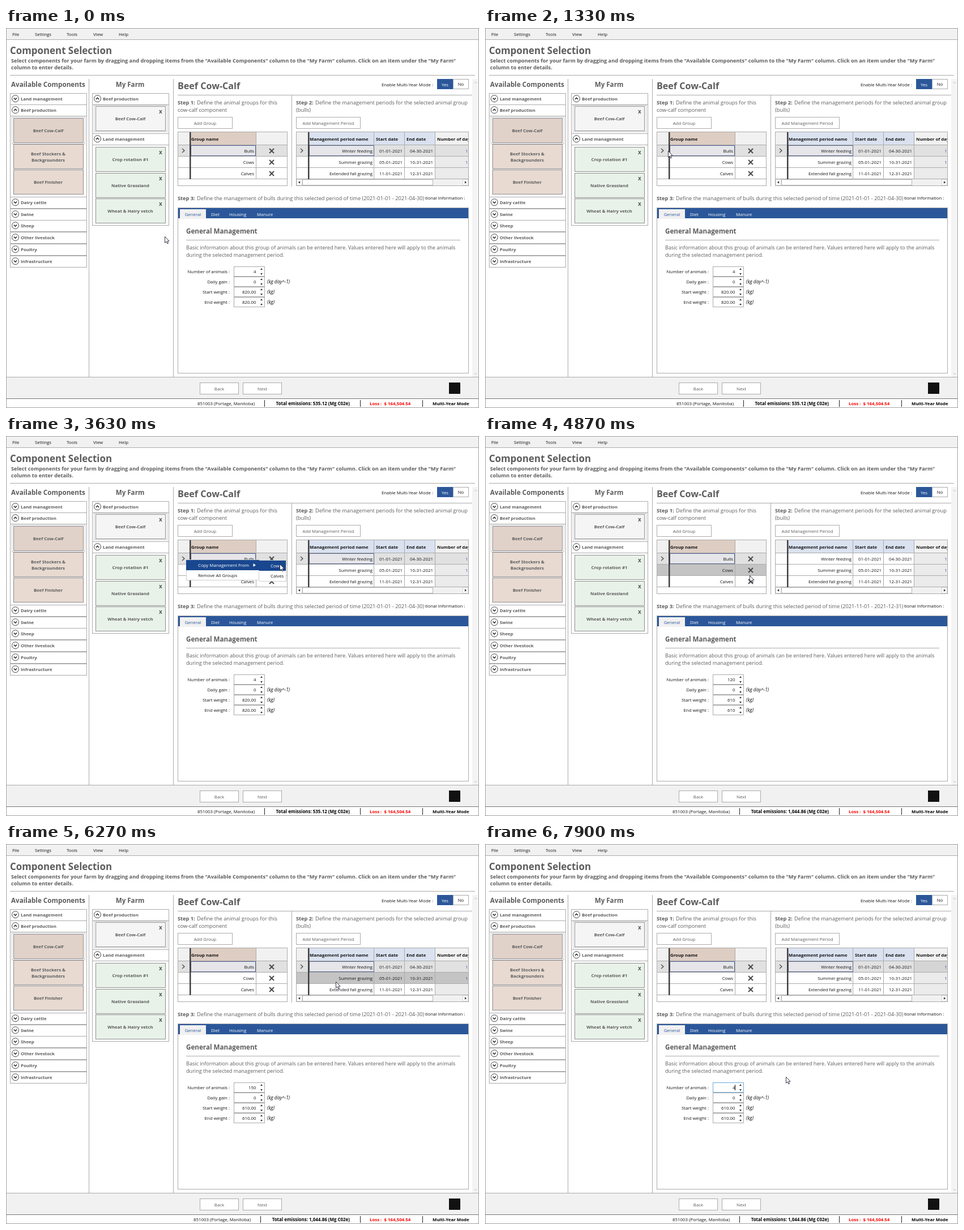
An HTML page with a canvas that plays this animation: 835x671 px, repeating every 8000 ms.

```html
<!DOCTYPE html>
<html lang="en">
<head>
<meta charset="utf-8">
<title>Component Selection</title>
<style>
  html, body { margin: 0; width: 100%; height: 100%; overflow: hidden; background: #fff; }
  canvas { display: block; }
</style>
</head>
<body>
<canvas id="stage" width="835" height="671"></canvas>
<script>
const ctx = document.getElementById('stage').getContext('2d');
const LOOP = 8000;
const GRAY = '#5c5c5c', INK = '#151515', EDGE = '#ababab', PANEL = '#f1f1f1';
const BLUE = '#2b579a', MENU_BLUE = '#19478f', SELECTED = '#e1e1e1', HOVER = '#c4c4c4';
const SMALL = 7.85, BODY = 9.25;

// Pointer path: [ms, x, y]
const PATH = [
  [70, 280, 368], [870, 335, 236], [1330, 323, 217], [1430, 318, 218], [2330, 318, 218],
  [2570, 345, 223], [2770, 349, 223], [2930, 349, 223], [3630, 483, 226], [3770, 483, 226],
  [4070, 461, 229], [4470, 461, 229], [4870, 467, 246], [5300, 467, 255], [5800, 562, 270],
  [6100, 600, 217], [6200, 600, 217], [6730, 465, 414], [6930, 450, 424], [7070, 440, 436],
  [7400, 440, 436], [7900, 531, 411]
];

const MENU_OPEN = 1970, SUBMENU_OPEN = 2520, COPIED = 4470, PERIOD_PICKED = 6200,
      FOCUSED = 7230, TYPED = 7400;

function pointerAt(t) {
  const next = PATH.findIndex(p => p[0] > t);
  if (next === 0) return PATH[0].slice(1);
  if (next < 0) return PATH[PATH.length - 1].slice(1);
  const [t0, x0, y0] = PATH[next - 1], [t1, x1, y1] = PATH[next];
  const k = (t - t0) / (t1 - t0);
  return [Math.round(x0 + (x1 - x0) * k), Math.round(y0 + (y1 - y0) * k)];
}

function fill(x, y, w, h, color) {
  ctx.fillStyle = color;
  ctx.fillRect(x, y, w, h);
}

function outline(x, y, w, h, edge) {
  ctx.strokeStyle = edge;
  ctx.lineWidth = 1;
  ctx.strokeRect(x + .5, y + .5, w - 1, h - 1);
}

function box(x, y, w, h, color = '#fff', edge = EDGE) {
  fill(x, y, w, h, color);
  outline(x, y, w, h, edge);
}

const hline = (x0, x1, y, color = EDGE) => fill(x0, y, x1 - x0, 1, color);
const vline = (x, y0, y1, color = EDGE) => fill(x, y0, 1, y1 - y0, color);

function text(str, x, y, { size = SMALL, bold = false, italic = false, color = INK, align = 'left' } = {}) {
  ctx.font = `${italic ? 'italic ' : ''}${bold ? 700 : 400} ${size}px "Open Sans", "Noto Sans", sans-serif`;
  ctx.fillStyle = color;
  ctx.textAlign = align;
  ctx.fillText(str, x, y);
}

const heading = (str, x, y, size, align) => text(str, x, y, { size, bold: true, color: GRAY, align });

function stroke(points, color, width) {
  ctx.beginPath();
  points.forEach(([x, y]) => ctx.lineTo(x, y));
  ctx.strokeStyle = color;
  ctx.lineWidth = width;
  ctx.stroke();
}

function polygon(points, color) {
  ctx.beginPath();
  points.forEach(([x, y]) => ctx.lineTo(x, y));
  ctx.closePath();
  ctx.fillStyle = color;
  ctx.fill();
}

// Small triangle pointing along (dx, dy)
function arrow(x, y, dx, dy, r, color = '#333') {
  polygon([[x + dx * r, y + dy * r], [x - dx * r / 2 + dy * r, y - dy * r / 2 + dx * r],
           [x - dx * r / 2 - dy * r, y - dy * r / 2 - dx * r]], color);
}

function clipped(x, y, w, h, paint) {
  ctx.save();
  ctx.beginPath();
  ctx.rect(x, y, w, h);
  ctx.clip();
  paint();
  ctx.restore();
}

function button(label, x, y, w, h, color = '#fff', ink = GRAY) {
  box(x, y, w, h, color);
  text(label, x + w / 2, y + h / 2 + 3, { align: 'center', color: ink });
}

function expander(label, x, y, w, open) {
  box(x, y, w, 21);
  const cx = x + 9.5, cy = y + 9.7, d = open ? -1 : 1;
  ctx.beginPath();
  ctx.arc(cx, cy, 6, 0, 7);
  ctx.strokeStyle = '#444';
  ctx.lineWidth = 1;
  ctx.stroke();
  stroke([[cx - 2.6, cy - 1.3 * d], [cx, cy + 1.5 * d], [cx + 2.6, cy - 1.3 * d]], '#222', 1.4);
  heading(label, x + 19, y + 13, SMALL);
}

function card(lines, x, y, color, removable, framed) {
  if (framed) box(x - 3, y - 2, 130, 48, '#fff', '#c9c9c9');
  box(x, y, 124, 44, color, '#8d8d8d');
  lines.forEach((s, i) =>
    heading(s, x + 61.5, y + 25 + (i - (lines.length - 1) / 2) * 11, SMALL, 'center'));
  if (removable) heading('x', x + 115, y + 13, 10, 'center');
}

function drawHeader() {
  fill(0, 0, 835, 20, PANEL);
  hline(0, 835, 20);
  [['File', 11], ['Settings', 51], ['Tools', 107], ['View', 154], ['Help', 199]]
    .forEach(([s, x]) => text(s, x, 14));
  heading('Component Selection', 7, 46, 16.9);
  heading('Select components for your farm by dragging and dropping items from the "Available Components" column to the "My Farm" column. Click on an item under the "My Farm"', 9, 61, 9.2);
  heading('column to enter details.', 9, 73, 9.2);
  hline(7, 828, 83);
}

function drawColumns() {
  vline(146, 90, 616);
  vline(295, 90, 616);
  heading('Available Components', 9, 104, 11.7);
  heading('My Farm', 219, 104, 11.6, 'center');

  box(7, 115, 136, 307);
  expander('Land management', 7, 115, 136, false);
  expander('Beef production', 7, 135, 136, true);
  card(['Beef Cow-Calf'], 13, 159, '#e1d2c9', false, true);
  card(['Beef Stockers &', 'Backgrounders'], 13, 205, '#e8dad1');
  card(['Beef Finisher'], 13, 250, '#e8dad1');
  ['Dairy cattle', 'Swine', 'Sheep', 'Other livestock', 'Poultry', 'Infrastructure']
    .forEach((s, i) => expander(s, 7, Math.round(298 + i * 20.7), 136, false));

  box(152, 115, 136, 234);
  expander('Beef production', 152, 115, 136, true);
  card(['Beef Cow-Calf'], 158, 138, '#f5f5f5', true, true);
  expander('Land management', 152, 186, 136, true);
  ['Crop rotation #1', 'Native Grassland', 'Wheat & Hairy vetch']
    .forEach((s, i) => card([s], 158, Math.round(210 + i * 45.5), '#e9f2e9', true));
}

function step(label, x, y, lines) {
  text(label, x, y, { size: BODY, bold: true, color: GRAY });
  text(lines[0], x + 34, y, { size: BODY, color: GRAY });
  if (lines[1]) text(lines[1], x, y + 12.5, { size: BODY, color: GRAY });
}

const chevron = (x, y) => stroke([[x - 2, y - 3.5], [x + 2, y], [x - 2, y + 3.5]], '#444', 1.2);

function currentCell(x, w) {
  box(x, 207, w, 19, '#e6e6ea', '#53648c');
}

function drawGroups(hovered) {
  box(303, 183, 194, 96);
  fill(304, 184, 192, 22, PANEL);
  fill(326, 184, 115, 22, '#ddcdc3');
  text('Group name', 327, 199, { bold: true });
  fill(304, 207, 192, 19, SELECTED);
  if (hovered > 0) fill(304, 207 + hovered * 20, 192, 19, HOVER);
  [206, 226, 246, 266].forEach(y => hline(304, 496, y));
  vline(441, 184, 266);
  currentCell(326, 115);
  fill(324, 184, 2.5, 83, '#404040');
  chevron(313, 216.5);
  ['Bulls', 'Cows', 'Calves'].forEach((s, i) => {
    const y = 217 + i * 20;
    text(s, 438, y + 3, { align: 'right' });
    stroke([[465, y - 4], [473, y + 4]], '#4a4a4a', 2);
    stroke([[473, y - 4], [465, y + 4]], '#4a4a4a', 2);
  });
}

function drawPeriods(hovered, selected, focused, thumbHovered) {
  box(512, 183, 305, 96);
  clipped(513, 184, 303, 94, () => {
    fill(513, 184, 303, 22, PANEL);
    fill(535, 184, 223, 22, '#dae2f0');
    fill(758, 207, 58, 59, '#ebebeb');
    if (selected) fill(513, 207, 303, 19, SELECTED);
    if (focused) fill(758, 207, 58, 19, '#d5d5d5');
    if (hovered > 0 || (hovered === 0 && !selected)) fill(513, 207 + hovered * 20, 303, 19, HOVER);
    [206, 226, 246, 266].forEach(y => hline(513, 816, y));
    [649, 703, 757].forEach(x => vline(x, 184, 266));
    if (selected) {
      currentCell(535, 115);
      chevron(522, 216.5);
    }
    fill(533, 184, 2.5, 83, '#404040');
    [['Management period name', 536], ['Start date', 653], ['End date', 707], ['Number of days', 761]]
      .forEach(([s, x]) => text(s, x, 199, { bold: true }));
    [['Winter feeding', '01-01-2021', '04-30-2021', '119'],
     ['Summer grazing', '05-01-2021', '10-31-2021', '183'],
     ['Extended fall grazing', '11-01-2021', '12-31-2021', '']].forEach(([name, start, end, days], i) => {
      const y = 220 + i * 20;
      text(name, 647, y, { align: 'right' });
      text(start, 700, y, { align: 'right' });
      text(end, 754, y, { align: 'right' });
      text(days, 811, y, { color: BLUE });
    });
    fill(513, 267, 303, 11, PANEL);
    box(523, 267, 231, 11, thumbHovered ? '#c2c2c2' : '#fff', '#b5b5b5');
    box(513, 267, 10, 11, '#fff', '#d5d5d5');
    box(806, 267, 10, 11, '#fff', '#d5d5d5');
    arrow(518, 272.5, -1, 0, 2.2);
    arrow(811, 272.5, 1, 0, 2.2);
  });
}

function drawDetails(t, px, py) {
  const copied = t >= COPIED, picked = t >= PERIOD_PICKED;
  const menuOpen = t >= MENU_OPEN && !copied;
  const row = !menuOpen && py >= 207 && py < 267 ? Math.floor((py - 207) / 20) : -1;
  const periodShown = !copied || picked;

  heading('Beef Cow-Calf', 303, 108, 16.1);
  text('Enable Multi-Year Mode :', 754, 103, { align: 'right' });
  button('No', 789, 90, 28, 18, '#fff', INK);
  fill(761, 90, 28, 18, BLUE);
  text('Yes', 775, 102.5, { color: '#fff', align: 'center' });
  hline(303, 823, 118);
  vline(504, 118, 280);

  fill(823, 90, 12, 526, '#f4f4f4');
  stroke([[826.5, 98], [829, 95], [831.5, 98]], '#c8c8c8', 1);
  stroke([[826.5, 609], [829, 612], [831.5, 609]], '#c8c8c8', 1);

  step('Step 1:', 303, 135, ['Define the animal groups for this', 'cow-calf component']);
  step('Step 2:', 512, 135, ['Define the management periods for the selected animal group', '(bulls)']);
  button('Add Group', 303, 157, 97, 21);
  button('Add Management Period', 512, 157, 114, 21);
  drawGroups(px >= 304 && px < 497 ? row : -1);
  drawPeriods(px >= 513 && px < 816 ? row : -1, periodShown, t >= FOCUSED,
    px >= 523 && px < 754 && py >= 267 && py < 279);

  const span = periodShown ? '2021-01-01 - 2021-04-30' : '2021-11-01 - 2021-12-31';
  step('Step 3:', 303, 304, [`Define the management of bulls during this selected period of time (${span})`]);
  text('tional Information :', 740, 303);

  box(303, 317, 514, 293);
  fill(304, 318, 512, 18, BLUE);
  fill(307, 320, 46, 17, PANEL);
  text('General', 330, 332, { color: BLUE, align: 'center' });
  [['Diet', 362], ['Housing', 394], ['Manure', 443]].forEach(([s, x]) => text(s, x, 332, { color: '#fff' }));
  heading('General Management', 318, 363, 11.65);
  hline(318, 802, 374);
  text('Basic information about this group of animals can be entered here. Values entered here will apply to the animals', 318, 391, { size: 9.1, color: GRAY });
  text('during the selected management period.', 318, 404, { size: 9.1, color: GRAY });

  const weight = !copied ? '820.00' : picked ? '610.00' : '610';
  const count = !copied || t >= TYPED ? '4' : picked ? '150' : '120';
  drawFields(t, [['Number of animals :', count, ''], ['Daily gain :', '0', '(kg day^-1)'],
    ['Start weight :', weight, '(kg)'], ['End weight :', weight, '(kg)']]);
}

function drawFields(t, rows) {
  rows.forEach(([label, value, unit], i) => {
    const y = 421 + i * 18, focused = i === 0 && t >= FOCUSED;
    text(label, 395, y + 12, { align: 'right' });
    box(402, y, 55, 18, '#fff', focused ? '#6fa8dc' : EDGE);
    const selecting = focused && t < TYPED;
    if (selecting) fill(427, y + 4, 15, 11, '#3b78c9');
    text(value, 441.5, y + 12, { align: 'right', color: selecting ? '#fff' : INK });
    if (focused && !selecting) vline(441, y + 4, y + 14, '#111');
    arrow(451, y + 5, 0, -1, 2);
    arrow(451, y + 13, 0, 1, 2);
    text(unit, 461, y + 12, { italic: true, size: 8.4 });
  });
}

function drawFooter(t) {
  fill(0, 616, 835, 39, PANEL);
  hline(0, 835, 616);
  button('Back', 342, 626, 69, 21);
  button('Next', 418, 626, 69, 21);
  fill(782, 626, 20, 20, '#111');
  fill(0, 655, 835, 16, '#fff');
  hline(0, 835, 654, '#777');
  const copied = t >= COPIED, shift = copied ? 7 : 0;
  text('851003 (Portage, Manitoba)', 338 - shift, 666);
  vline(456 - shift, 657, 669, '#222');
  text(`Total emissions: ${copied ? '1,044.86' : '535.12'} (Mg C02e)`, 607, 666,
    { bold: true, size: 7.95, align: 'right', color: '#000' });
  vline(625, 657, 669, '#222');
  text('Loss :  $ 164,504.54', 642, 666, { bold: true, color: '#f00' });
  vline(735, 657, 669, '#222');
  text('Multi-Year Mode', 753, 666, { bold: true, color: '#000' });
  outline(0, 0, 835, 671, '#a0a0a0');
}

function drawMenu(t, px) {
  if (t < MENU_OPEN || t >= COPIED) return;
  const active = px > 320;
  box(318, 218, 129, 37, '#fff', '#cdcdcd');
  if (active) fill(318, 219, 129, 18, MENU_BLUE);
  const ink = active ? '#fff' : INK;
  text('Copy Management From', 339, 231, { color: ink });
  arrow(438, 228, 1, 0, 3, ink);
  text('Remove All Groups', 339, 248.5);

  const width = 49 * Math.min(1, (t - SUBMENU_OPEN) / 250);
  if (width <= 0) return;
  clipped(447, 219, width, 38, () => {
    const x = 446 + width - 49;
    const hot = px > 447;
    box(x, 219, 49, 38, '#fff', '#cdcdcd');
    if (hot) fill(x + 1, 220, 47, 18, MENU_BLUE);
    text('Cows', x + 21, 232, { color: hot ? '#fff' : INK });
    text('Calves', x + 21, 250);
  });
}

function drawPointer(x, y) {
  if (x >= 402 && x < 446 && y >= 421 && y < 493) {
    vline(x, y - 6, y + 6, '#222');
    hline(x - 2, x + 3, y - 6, '#222');
    hline(x - 2, x + 3, y + 5, '#222');
    return;
  }
  const shape = [[0, 0], [0, 11], [2.6, 8.7], [4.3, 12.6], [6, 11.9], [4.4, 8], [7.6, 8]]
    .map(([dx, dy]) => [x + .5 + dx, y + .3 + dy]);
  polygon(shape, '#fff');
  stroke([...shape, shape[0]], '#26263a', .9);
}

function frame(now) {
  const t = now % LOOP;
  const [px, py] = pointerAt(t);
  fill(0, 0, 835, 671, '#fff');
  drawHeader();
  drawColumns();
  drawDetails(t, px, py);
  drawFooter(t);
  drawMenu(t, px);
  drawPointer(px, py);
}

const start = performance.now();
(function tick() {
  frame(performance.now() - start);
  requestAnimationFrame(tick);
})();
</script>
</body>
</html>
```
